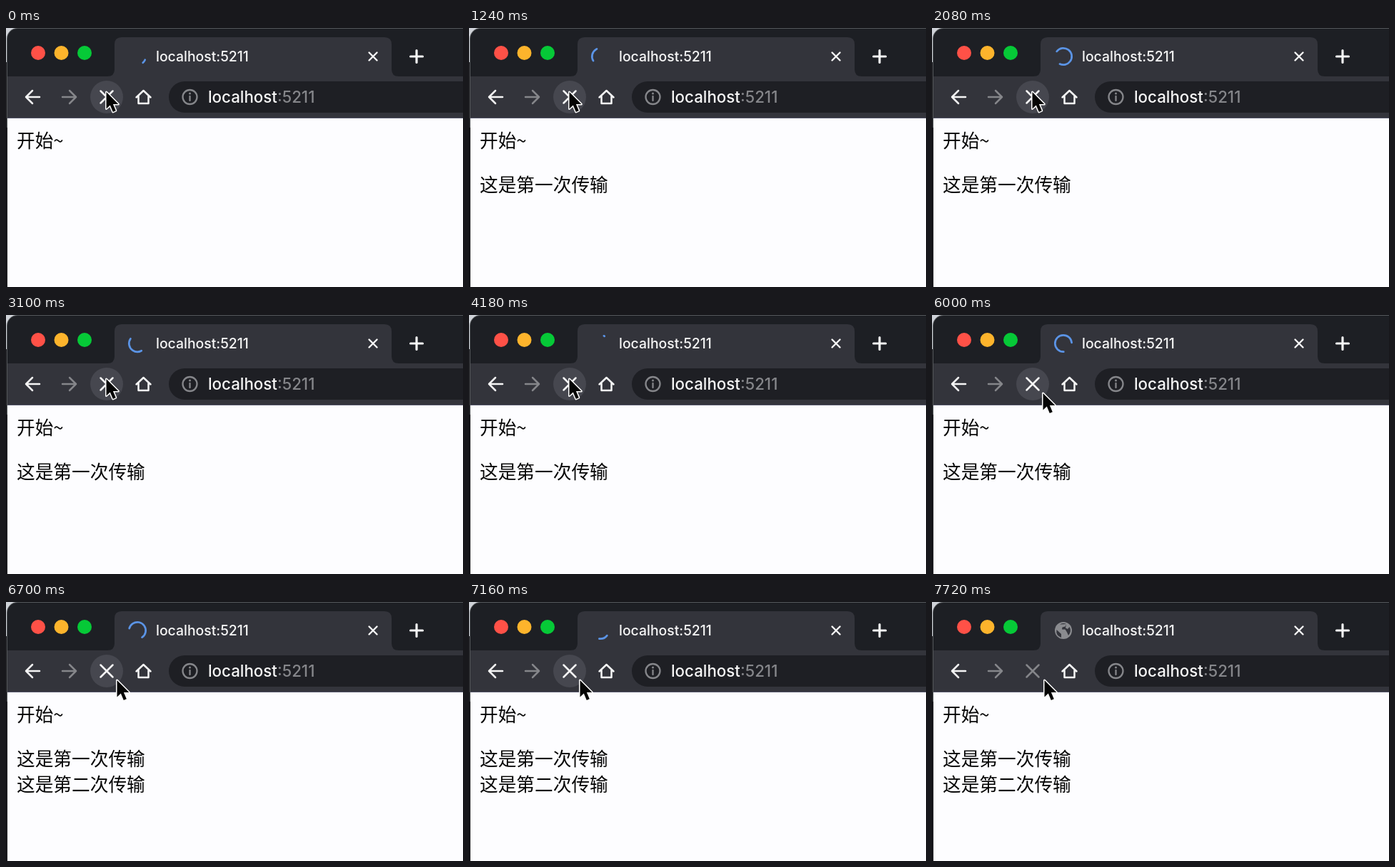
Animation, 640 px wide and 364 px high, one loop 7.74 s. Source, as an HTML page with a canvas:

```html
<!DOCTYPE html>
<html lang="zh">
<head>
<meta charset="utf-8">
<style>
  html, body { margin: 0; width: 640px; height: 364px; overflow: hidden; background: #fdfdff; }
  canvas { display: block; }
</style>
</head>
<body>
<canvas id="stage" width="640" height="364"></canvas>
<script>
const ctx = document.getElementById('stage').getContext('2d');
const LOOP = 7740, FRAME = 1000 / 60;
const STRIP = '#1d1f24', BAR = '#33343b', FIELD = '#1e1f24', HOVER = '#46474f';
const LIGHT = '#f6f6f6', DIM = '#85868a', BLUE = '#5b94e6', PAGE = '#fdfdff';
const UI = 'Inter, Roboto, sans-serif';
const CJK = '"Noto Sans CJK SC", "Noto Sans CJK", sans-serif';

// Steps at which things happen
const FIRST = 15, SECOND = 137, DONE = 162;

// Playback is uneven: two short steps, then a long hold
function stepAt(t) {
  const m = t % 140;
  return 3 * Math.floor(t / 140) + (m < 20 ? 0 : m < 120 ? 1 : 2);
}

function smooth(x) {
  x = Math.min(1, Math.max(0, x));
  return x * x * (3 - 2 * x);
}

// cubic-bezier(.4, 0, .2, 1)
function ease(x) {
  let lo = 0, hi = 1, u;
  for (let i = 0; i < 24; i++) {
    u = (lo + hi) / 2;
    const v = 1 - u;
    if (1.2 * v * v * u + 0.6 * v * u * u + u * u * u < x) lo = u; else hi = u;
  }
  return 3 * u * u - 2 * u * u * u;
}

function rect(x, y, w, h, color, radius = 0) {
  ctx.fillStyle = color;
  ctx.beginPath();
  ctx.roundRect(x, y, w, h, radius);
  ctx.fill();
}

function disc(x, y, r, color) {
  ctx.fillStyle = color;
  ctx.beginPath();
  ctx.arc(x, y, r, 0, 2 * Math.PI);
  ctx.fill();
}

function line(d, color, width) {
  ctx.strokeStyle = color;
  ctx.lineWidth = width;
  ctx.stroke(new Path2D(d));
}

function shape(d, color) {
  ctx.fillStyle = color;
  ctx.fill(new Path2D(d));
}

function text(s, x, y, font, color) {
  ctx.font = font;
  ctx.fillStyle = color;
  ctx.fillText(s, x, y);
  return x + ctx.measureText(s).width;
}

function drawWindow() {
  rect(0, 0, 640, 364, '#1c1c20');
  rect(0, 0, 20, 48, '#cfd2d8');
  rect(1, 0, 660, 140, '#54575a', [15, 0, 0, 0]);
  rect(2, 1, 660, 140, STRIP, [14, 0, 0, 0]);
  shape('M142 68 Q152 68 152 58 V23 Q152 13 162 13 H530 Q540 13 540 23 V58 Q540 68 550 68 Z', BAR);
  rect(2, 68, 638, 58, BAR);
  rect(2, 126, 638, 1, '#55566a');
  rect(2, 127, 638, 237, PAGE);
  ['#ff5147', '#fdb42c', '#06c937'].forEach((c, i) => disc(45 + 32.5 * i, 35, 10, c));

  text('localhost:5211', 210, 47, '500 19.4px ' + UI, LIGHT);
  line('M508.5 34.5 l11 11 m0 -11 l-11 11', LIGHT, 2.4);
  line('M566.5 40 h17 m-8.5 -8.5 v17', LIGHT, 3.2);

  line('M47 97 H28 m9 -9 l-9 9 l9 9', LIGHT, 2.5);
  line('M79 97 H98 m-9 -9 l9 9 l-9 9', DIM, 2.5);
  line('M182.5 97.5 L192.5 88 L202.5 97.5 M185.5 95.5 V106 H199.5 V95.5', LIGHT, 2.5);

  rect(228, 75, 460, 44, FIELD, 22);
  line('M247.5 97 a10 10 0 1 0 20 0 a10 10 0 1 0 -20 0 M257.5 96 v6', DIM, 2.3);
  disc(257.5, 92, 1.5, DIM);
  const end = text('localhost', 283, 105, '500 22.3px ' + UI, LIGHT);
  text(':5211', end, 105, '500 22.3px ' + UI, DIM);
}

function drawSpinner(step) {
  const elapsed = 430 + step * FRAME;
  const half = Math.floor(elapsed / 666);
  let sweep = 270 * ease(elapsed / 666 - half);
  if (half % 2 === 0) sweep -= 270;
  if (Math.abs(sweep) < 5) sweep = half % 2 ? 5 : -5;
  const start = 310 + elapsed * 360 / 1568 + 270 * Math.floor(half / 2);
  const rad = Math.PI / 180;
  ctx.strokeStyle = BLUE;
  ctx.lineWidth = 2.7;
  ctx.beginPath();
  ctx.arc(184, 40, 11.7, start * rad, (start + sweep) * rad, sweep < 0);
  ctx.stroke();
}

function drawGlobe() {
  disc(184, 40, 12, '#8a8b8f');
  shape('M174.5 39 L181 45 V50 Q173 47 174.5 39 Z', BAR);
  shape('M179 31.5 Q184 29 188 31 L186.5 34.5 L182.5 35.5 L182 38.5 H186.5 L189 42.5 L191 47 Q196 41 192.5 35 L190 38 L187 36.5 L188 31 Z', BAR);
}

function drawCursor(step) {
  const k = smooth((step - 98) / 20), nudge = smooth((step - 155) / 6);
  ctx.save();
  ctx.translate(140.5 + 15 * k + 2 * nudge, 90 + 20 * k);
  const arrow = 'M0 0 V23.5 L5.3 18.6 L9.3 28 L13.3 26.2 L9.4 17 H16.8 Z';
  line(arrow, '#fff', 3);
  shape(arrow, '#050505');
  ctx.restore();
}

function draw(step) {
  const done = step >= DONE;
  ctx.lineCap = ctx.lineJoin = 'round';
  drawWindow();
  if (done) drawGlobe(); else drawSpinner(step);
  if (!done) disc(141, 97, 23, HOVER);
  line('M132.5 88.5 l17 17 m0 -17 l-17 17', done ? DIM : LIGHT, 2.5);

  const say = (s, y) => text(s, 15, y, '500 25.7px ' + CJK, '#050505');
  say('开始~', 167.5);
  if (step >= FIRST) say('这是第一次传输', 229.5);
  if (step >= SECOND) say('这是第二次传输', 266);
  drawCursor(step);
}

const begin = performance.now();
function tick() {
  draw(stepAt((performance.now() - begin) % LOOP));
  requestAnimationFrame(tick);
}
tick();
</script>
</body>
</html>
```
